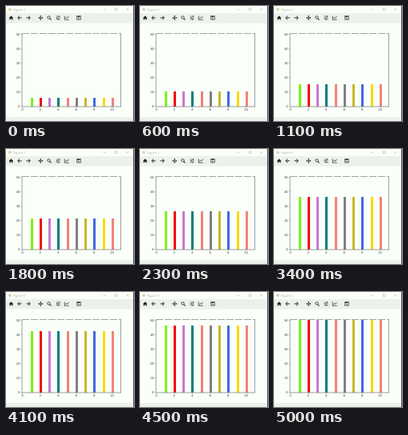
An HTML page with a canvas for the animation above (5200 ms loop, 160 by 144 pixels).

```html
<!DOCTYPE html>
<html lang="en">
<head>
<meta charset="utf-8">
<title>Figure 1</title>
<style>
html, body { margin: 0; width: 100%; height: 100%; overflow: hidden; background: #fafffa; }
canvas { display: block; width: 160px; height: 144px; }
</style>
</head>
<body>
<canvas id="stage" width="160" height="144"></canvas>
<script>
const ctx = document.getElementById('stage').getContext('2d');
const LOOP = 5200, TICK = 100;
const HOLDS = [4, 15, 26, 38, 49];  // ticks on which the bars rest
const LATE = [24, 36];              // ticks made up for by a double step
const COLORS = ['#7cf410', '#f00808', '#cc78d2', '#008078', '#f58276',
                '#808080', '#c6b82c', '#4169e1', '#fbd80c', '#f58276'];
const PAPER = '#fafffa', PANEL = '#edf1ec', INK = '#1a1c1a';
const AXES = { left: 20, right: 144, top: 34.5, bottom: 126 };
const xOf = v => AXES.left + 0.4 + v * 11.22;
const yOf = v => AXES.bottom - v * 1.81;

function valueAt(ms) {
  let tick = Math.floor(ms / TICK);
  if (LATE.includes(tick)) tick--;
  const rests = HOLDS.filter(h => h <= tick).length;
  return Math.min(50, Math.max(6, 5 + tick - rests));
}

function rect(x, y, w, h, color) {
  ctx.fillStyle = color;
  ctx.fillRect(x, y, w, h);
}

function frame(x, y, size, color, width) {
  ctx.strokeStyle = color;
  ctx.lineWidth = width;
  ctx.strokeRect(x, y, size, size);
}

function line(points, color, width = 1) {
  ctx.beginPath();
  points.forEach(([x, y]) => ctx.lineTo(x, y));
  ctx.strokeStyle = color;
  ctx.lineWidth = width;
  ctx.stroke();
}

function fill(points, color) {
  ctx.beginPath();
  points.forEach(([x, y]) => ctx.lineTo(x, y));
  ctx.fillStyle = color;
  ctx.fill();
}

function ring(x, y, r, color, width) {
  ctx.beginPath();
  ctx.arc(x, y, r, 0, Math.PI * 2);
  ctx.strokeStyle = color;
  ctx.lineWidth = width;
  ctx.stroke();
}

function text(s, x, y, size, color, align, family) {
  ctx.font = `${size}px ${family}`;
  ctx.textAlign = align;
  ctx.textBaseline = 'middle';
  ctx.fillStyle = color;
  ctx.fillText(s, x, y);
}

function titleBar() {
  const gray = '#a3a8a3';
  ring(4.8, 4.2, 0.9, '#d3cf90', 1.6);
  text('Figure 1', 9, 4.6, 4.2, '#a8aca8', 'left', '"Open Sans", sans-serif');
  line([[121.5, 4.5], [124.5, 4.5]], gray, 0.5);
  frame(136.5, 3, 2.6, gray, 0.5);
  line([[150.5, 3], [153.2, 5.7]], gray, 0.5);
  line([[153.2, 3], [150.5, 5.7]], gray, 0.5);
}

// Icons are drawn around their own centre.
const arrow = dir => () => {
  line([[-3 * dir, 0], [2.4 * dir, 0]], INK, 1.1);
  line([[0, -2.7], [2.8 * dir, 0], [0, 2.7]], INK, 1.1);
};

function home() {
  fill([[-3.2, 0.2], [0, -3], [3.2, 0.2], [2.3, 0.2], [2.3, 3],
        [0.8, 3], [0.8, 1], [-0.8, 1], [-0.8, 3], [-2.3, 3], [-2.3, 0.2]], INK);
}

function move() {
  for (const [dx, dy] of [[1, 0], [-1, 0], [0, 1], [0, -1]]) {
    line([[0, 0], [dx * 3, dy * 3]], INK, 0.9);
    fill([[dx * 3.5, dy * 3.5], [dx * 2 + dy * 1.3, dy * 2 + dx * 1.3],
          [dx * 2 - dy * 1.3, dy * 2 - dx * 1.3]], INK);
  }
}

function zoom() {
  ring(-0.6, -0.6, 2, INK, 0.9);
  line([[0.9, 0.9], [3, 3]], INK, 1.2);
}

function sliders() {
  [[-2.2, 1.3], [0, -1.5], [2.2, 0.5]].forEach(([y, knob]) => {
    line([[-3, y], [3, y]], INK, 0.6);
    rect(knob - 0.5, y - 0.8, 1, 1.6, INK);
  });
}

function chart() {
  line([[-3.2, -2.8], [-3.2, 2.8], [3.2, 2.8]], INK, 0.8);
  line([[-2.2, 1], [-0.5, -0.7], [0.7, 0.4], [3, -2.3]], INK, 0.9);
}

function save() {
  frame(-2.6, -2.6, 5.2, INK, 0.8);
  rect(-1.7, -2.2, 2.8, 1.3, INK);
  ring(0, 1, 0.5, INK, 0.7);
}

function toolbar() {
  rect(0, 9, 160, 12.5, PANEL);
  const icons = [[6.4, home], [17, arrow(-1)], [28, arrow(1)], [43.3, move],
                 [54, zoom], [65.2, sliders], [76, chart], [91, save]];
  for (const [x, icon] of icons) {
    ctx.save();
    ctx.translate(x, 14.8);
    ctx.scale(0.85, 0.85);
    icon();
    ctx.restore();
  }
}

function plot(value) {
  const { left, right, top, bottom } = AXES;
  const family = '"DejaVu Sans", sans-serif';
  const barTop = Math.floor(yOf(value));
  COLORS.forEach((color, i) => {
    rect(Math.round(xOf(i + 1) - 0.8), barTop, 3, bottom - barTop, color);
  });

  ctx.setLineDash([9, 2]);
  line([[left, top], [right, top]], '#a2a5a2', 1);
  ctx.setLineDash([]);
  line([[left, bottom], [right, bottom]], '#777', 0.7);
  line([[left, top], [left, bottom]], '#777', 0.7);
  line([[right - 0.5, top], [right - 0.5, bottom]], '#777', 0.7);

  for (let v = 0; v <= 50; v += 10) {
    line([[left - 1.4, yOf(v)], [left, yOf(v)]], '#777', 0.5);
    text(v, left - 2.4, yOf(v) + 0.2, 3.9, '#444', 'right', family);
  }
  for (let v = 0; v <= 10; v += 2) {
    line([[xOf(v), bottom], [xOf(v), bottom + 1.4]], '#777', 0.5);
    text(v, xOf(v), bottom + 4.4, 3.9, '#444', 'center', family);
  }
}

function draw(ms) {
  rect(0, 0, 160, 144, PAPER);
  titleBar();
  toolbar();
  plot(valueAt(ms % LOOP));
  rect(0, 139, 160, 5, PANEL);
  rect(159, 0, 1, 144, '#555');
}

const start = performance.now();
function loop() {
  draw(performance.now() - start);
  requestAnimationFrame(loop);
}
loop();
</script>
</body>
</html>
```
